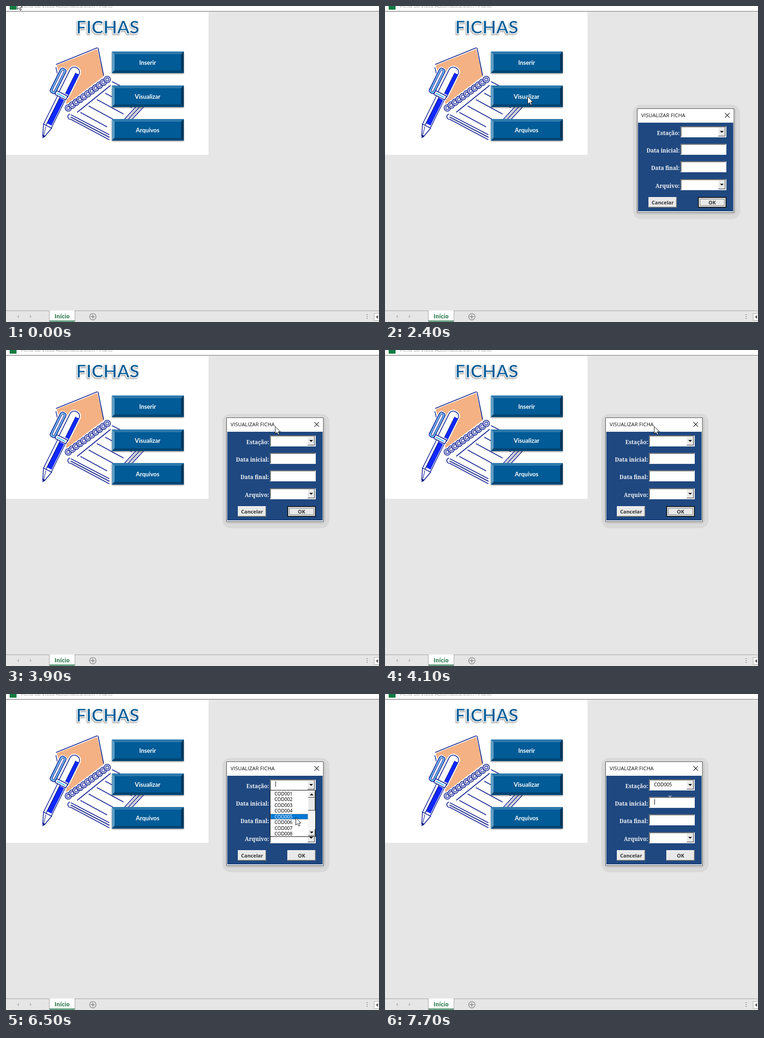
Recreate the animation shown at these times as an HTML page with a canvas. Size 814 by 688 pixels, loop 8 s.

```html
<!DOCTYPE html>
<html lang="pt">
<head>
<meta charset="utf-8">
<title>Fichas</title>
<style>
html, body { margin: 0; width: 100%; height: 100%; overflow: hidden; background: #e6e6e6; }
canvas { display: block; }
</style>
</head>
<body>
<canvas id="stage" width="814" height="688"></canvas>
<script>
const ctx = document.getElementById('stage').getContext('2d');
const LOOP = 8000, STEP = 100;
const NAVY = '#0b1a8c', BLUE = '#1027ff', CYAN = '#35b4ff';
const SANS = '"Open Sans", sans-serif', LATO = 'Lato, Carlito, sans-serif';
const ITEM_FONT = '10.2px "Noto Sans", sans-serif';
const ACTIVE = 400, OPEN = 2300, GRAB = 3600, DROP = 3900;
const LIST_OPEN = 4800, PICK = 6700, NEXT_FIELD = 7600;

// each move: start, end, target x, target y, sideways bend of the path
const moves = [
  [300, 1300, 311, 197, 0, 140],
  [2600, 3500, 656, 242, 280, 75],
  [GRAB, 3700, 609, 219, 0, 0],
  [3800, DROP, 587, 166, 0, 0],
  [4100, 4700, 659, 197, 0, 0],
  [5800, 6500, 632, 269, 0, 70],
  [6800, 7700, 622, 229, 0, 0]
];

function pointerAt(t) {
  let x = 24, y = -9;
  for (const [from, to, tx, ty, bx, by] of moves) {
    const k = Math.min(1, Math.max(0, (t - from) / (to - from)));
    const bend = Math.sin(Math.PI * k);
    if (k > 0) {
      x += (tx - x) * k + bx * bend;
      y += (ty - y) * k + by * bend;
    }
  }
  return [Math.round(x), Math.round(y)];
}

function rect(x, y, w, h, color) {
  ctx.fillStyle = color;
  ctx.fillRect(x, y, w, h);
}

function frame(x, y, w, h, color, dash = []) {
  ctx.setLineDash(dash);
  ctx.strokeStyle = color;
  ctx.lineWidth = 1;
  ctx.strokeRect(x + .5, y + .5, w - 1, h - 1);
  ctx.setLineDash([]);
}

function paint(fill, stroke, width) {
  if (fill) {
    ctx.fillStyle = fill;
    ctx.fill();
  }
  if (stroke) {
    ctx.strokeStyle = stroke;
    ctx.lineWidth = width;
    ctx.stroke();
  }
}

function round(x, y, w, h, r, fill, stroke, width) {
  ctx.beginPath();
  ctx.roundRect(x, y, w, h, r);
  paint(fill, stroke, width);
}

function poly(points, fill, stroke, width) {
  ctx.beginPath();
  for (let i = 0; i < points.length; i += 2) ctx.lineTo(points[i], points[i + 1]);
  ctx.closePath();
  paint(fill, stroke, width);
}

function line(x1, y1, x2, y2, color = NAVY, width = 1.7) {
  ctx.beginPath();
  ctx.moveTo(x1, y1);
  ctx.lineTo(x2, y2);
  paint(null, color, width);
}

function circle(x, y, r, color, width, fill) {
  ctx.beginPath();
  ctx.arc(x, y, r, 0, Math.PI * 2);
  paint(fill, color, width);
}

function triangle(x, y, w, h, color) {
  poly([x - w, y - h, x + w, y - h, x, y + h], color);
}

function text(str, x, y, font, color, align = 'left') {
  ctx.font = font;
  ctx.textAlign = align;
  ctx.fillStyle = color;
  ctx.fillText(str, x, y);
}

function drawWindow(active) {
  rect(0, 0, 814, 688, '#e6e6e6');
  rect(0, 0, 814, 11, '#fff');
  rect(0, 11, 814, 1, active ? '#217346' : '#6b6b6b');
  rect(8, -7, 15, 15, '#107c41');
  text('Ficha de Visita Automática.xlsm - Plano', 33, 4, '11px ' + SANS, active ? '#333' : '#aaa');
  rect(0, 13, 442, 311, '#fff');

  rect(0, 663, 814, 1, '#9f9f9f');
  rect(94, 663, 57, 24, '#9f9f9f');
  rect(95, 663, 55, 24, '#fff');
  rect(95, 685, 55, 2, '#217346');
  text('Início', 122.5, 680, '700 12px ' + SANS, '#217346', 'center');
  poly([24, 676, 28, 672, 28, 680], '#bdbdbd');
  poly([56, 676, 52, 672, 52, 680], '#bdbdbd');
  circle(189.5, 676.5, 7, '#6a6a6a', 1.1);
  rect(185, 676, 9, 1, '#555');
  rect(189, 672, 1, 9, '#555');
  for (let i = 0; i < 3; i++) rect(787, 671 + i * 4, 2, 2, '#999');
  rect(803, 669, 11, 16, '#fff');
  frame(803, 669, 14, 16, '#aaa');
  poly([807, 677, 812, 673, 812, 681], '#555');
}

function drawHeading() {
  ctx.save();
  ctx.translate(222, 59.5);
  ctx.font = '700 39px ' + LATO;
  ctx.textAlign = 'center';
  ctx.lineJoin = 'round';
  ctx.strokeStyle = '#fff';
  ctx.fillStyle = '#005b97';
  ctx.save();
  ctx.shadowColor = 'rgba(0,0,0,.5)';
  ctx.shadowBlur = 3;
  ctx.shadowOffsetX = -1;
  ctx.shadowOffsetY = 2;
  ctx.lineWidth = 2;
  ctx.strokeText('FICHAS', 0, 0);
  ctx.restore();
  ctx.fillText('FICHAS', 0, 0);
  ctx.lineWidth = 1;
  ctx.strokeText('FICHAS', 0, 0);
  ctx.restore();
}

function drawNotebook() {
  ctx.save();
  ctx.lineCap = ctx.lineJoin = 'round';
  poly([111, 129, 199, 94, 213, 153, 132, 214], '#f4b183');
  line(110, 127, 199, 91);
  line(201, 92, 213, 151);
  for (let i = 0; i < 3; i++) line(109 + i * 6, 134 + i * 25, 112 + i * 6, 147 + i * 25, NAVY, 1.5);

  // page edges and ruled lines share one slant
  line(228, 173, 156, 231);
  line(232, 165, 250, 174);
  for (let i = 0; i < 4; i++) {
    const x = 217 - i * 18, y = 190 + i * 14;
    line(x, y, x + 57, y + 31);
  }
  line(140, 242, 226, 286, '#c9c9d2', 3);
  for (let i = 0; i < 3; i++) line(142, 237 + i * 5, 225, 280 + i * 5.5, NAVY, 1.6);
  ctx.beginPath();
  ctx.arc(141, 241, 6, Math.PI / 2, Math.PI * 1.4);
  paint(null, NAVY, 1.7);
  for (let i = 0; i < 3; i++) {
    const x = 284 + i * 8.5;
    if (i) line(x - 4, 219, x - 30, 247, '#c9c9d2', 3);
    line(x, 219, x - 26, 247, NAVY, 1.6);
  }

  for (let i = 0; i <= 10; i++) {
    const x = 136 + i * 8.5, y = 222 - i * 6.2;
    circle(x, y, 7, NAVY, 1.6, '#dfe1f3');
    circle(x, y, 3.3, NAVY, 1.4, '#fff');
  }
  drawPen();
  ctx.restore();
}

// upright pen with its tip at the origin, then tilted
function drawPen() {
  ctx.save();
  ctx.translate(81, 288);
  ctx.rotate(26.5 * Math.PI / 180);
  const cap = [10, 10, 0, 0];
  round(-14, -170, 22, 66, cap, '#fff', '#fff', 6);
  round(-33, -156, 13, 59, 5, '#fff', '#fff', 5);
  rect(-16, -104, 25, 78, '#fff');

  round(-14, -170, 22, 66, cap, '#fff', NAVY, 1.6);
  rect(0, -159, 8, 50, BLUE);
  line(0, -159, 0, -109, NAVY, 1.2);
  round(-33, -156, 13, 59, 5, null, NAVY, 1.8);
  round(-31, -154, 9, 55, 3, null, CYAN, 1.5);
  round(-29, -152, 5, 51, 2, '#fff', NAVY, 1.3);

  rect(-7, -95, 11, 62, BLUE);
  for (const x of [-13, -7, 6]) line(x, -96, x, -28, NAVY, 1.5);
  round(-20, -106, 27, 9, 2, '#fff', NAVY, 1.7);
  line(-16, -101, 3, -101, CYAN, 2);
  poly([-13, -28, 7, -28, 1, -4, -3, -4], '#fff', NAVY, 1.6);
  line(-6, -25, -2, -8, NAVY, 1.2);
  triangle(-1, -3, 3, 4, NAVY);
  ctx.restore();
}

function drawMenuButton(label, y) {
  const x = 231, r = 388, b = y + 47, e = 6;
  ctx.save();
  ctx.shadowColor = 'rgba(0,0,0,.45)';
  ctx.shadowBlur = 3;
  ctx.shadowOffsetY = 1.5;
  rect(x, y, r - x, b - y, '#005b97');
  ctx.restore();
  poly([x, y, r, y, r - e, y + e, x + e, y + e], '#2d79ac');
  poly([x, y, x + e, y + e, x + e, b - e, x, b], '#5e9dc4');
  poly([r, y, r, b, r - e, b - e, r - e, y + e], '#00375d');
  poly([x, b, x + e, b - e, r - e, b - e, r, b], '#004673');
  text(label, 309, y + 29, '700 13px ' + LATO, '#fff', 'center');
}

function drawField(x, y) {
  rect(x, y, 100, 24, '#f4f4f4');
  rect(x, y, 99, 23, '#8a8a8a');
  rect(x + 1, y + 1, 97, 21, '#555');
  rect(x + 2, y + 2, 97, 21, '#fff');
}

function bevel(x, y, w, h) {
  rect(x, y, w, h, '#666');
  rect(x, y, w - 1, h - 1, '#fff');
  rect(x + 1, y + 1, w - 2, h - 2, '#a6a6a6');
  rect(x + 1, y + 1, w - 3, h - 3, '#e9e9e9');
}

function arrowButton(x, y, w, h, up) {
  bevel(x, y, w, h);
  triangle(x + w / 2, y + h / 2, 4, up ? -2 : 2, '#000');
}

function drawCombo(x, y) {
  drawField(x, y);
  arrowButton(x + 82, y + 2, 16, 20);
}

function pushButton(label, x, y, focused) {
  bevel(x, y, 62, 23);
  if (focused) {
    frame(x, y, 62, 23, '#000');
    frame(x + 1, y + 1, 60, 21, '#555');
    frame(x + 4, y + 4, 54, 15, '#000', [1, 1]);
  }
  text(label, x + 31, y + 16, '700 11px "Noto Sans", sans-serif', '#333', 'center');
}

function drawDialog(x, y, t) {
  round(x - 10, y - 9, 234, 249, 18, '#d9d9d9');
  round(x - 3, y - 2, 218, 232, 7, '#c9c9c9');
  rect(x - 1, y - 1, 212, 227, '#555');
  rect(x, y, 210, 225, '#fff');
  rect(x + 1, y + 30, 208, 193, '#1f4880');
  text('VISUALIZAR FICHA', x + 8, y + 18, '11.4px ' + SANS, '#111');
  line(x + 191, y + 9, x + 201, y + 19, '#222', 1.1);
  line(x + 201, y + 9, x + 191, y + 19, '#222', 1.1);

  ['Estação:', 'Data inicial:', 'Data final:', 'Arquivo:'].forEach((label, i) => {
    const fy = Math.floor(y + 38 + i * 38.4);
    const drawInput = i % 3 ? drawField : drawCombo;
    text(label, x + 92, fy + 19, '700 11.8px "Noto Serif", serif', '#f5f5f5', 'right');
    drawInput(x + 94, fy);
  });
  pushButton('Cancelar', x + 24, y + 192, false);
  pushButton('OK', x + 132, y + 192, t < LIST_OPEN);

  if (t >= PICK) text('COD005', x + 105, y + 53, ITEM_FONT, '#000');
  const caretOn = t >= 4920 && Math.floor((t - 4920) / 530) % 2 === 0;
  if (t >= NEXT_FIELD) rect(x + 106, y + 81, 1, 12, '#000');
  else if (caretOn) rect(x + 106, y + 42, 1, 12, '#000');
}

function drawList(pointerY) {
  const x = 576, y = 209, rowH = 12.5;
  const row = Math.min(7, Math.floor((pointerY - 210) / rowH));
  rect(x, y, 100, 102, '#000');
  rect(x + 1, y + 1, 98, 100, '#fff');
  for (let i = 0; i < 8; i++) {
    const top = Math.round(210.5 + i * rowH), hot = i === row;
    if (hot) rect(x + 1, top, 82, 12, '#0078d7');
    if (i === Math.max(row, 0)) frame(x + 1, top, 82, 12, hot ? '#e0a060' : '#000', [1, 1]);
    text('COD00' + (i + 1), x + 10, top + 9.5, ITEM_FONT, hot ? '#fff' : '#000');
  }
  rect(x + 83, y + 1, 16, 100, '#f5f5f5');
  arrowButton(x + 83, y + 2, 16, 15, true);
  bevel(x + 83, y + 17, 16, 28);
  arrowButton(x + 83, y + 85, 16, 15, false);
}

function drawArrow() {
  poly([0, 0, 0, 16, 4, 12.5, 6.5, 18, 9, 17, 6.5, 11.5, 11.5, 11.5], '#fff', '#111', 1);
}

function drawHand() {
  // dark silhouette first, white on top
  for (const [grow, color] of [[1, '#111'], [0, '#fff']]) {
    const part = (x, y, w, h, r) =>
      round(x - grow, y - grow, w + grow * 2, h + grow * 2, r + grow, color);
    part(-1, 1, 3, 14, 1.5);
    for (let i = 1; i < 4; i++) part(i * 3 - 1, 6 + i, 3, 8, 1.5);
    part(-5, 11, 4, 4, 2);
    part(-3, 12, 13, 6, 2);
    part(-1, 14, 9, 6, 1);
  }
  for (let i = 1; i < 4; i++) line(i * 3 - 1, 9, i * 3 - 1, 12, '#111', .8);
}

function drawBeam() {
  rect(-4, -8, 3, 1, '#fff');
  rect(0, -8, 3, 1, '#fff');
  rect(-1, -7, 1, 14, '#fff');
}

const menu = ['Inserir', 'Visualizar', 'Arquivos'];
const menuY = i => Math.round(99 + i * 73.5);

function drawPointer(t, x, y) {
  const overMenu = x > 230 && x < 389 && menu.some((_, i) => y >= menuY(i) && y < menuY(i) + 47);
  ctx.save();
  ctx.translate(x + .5, y + .5);
  if (t < 2400 && overMenu) drawHand();
  else if (t >= 7400) drawBeam();
  else drawArrow();
  ctx.restore();
}

function draw(ms) {
  const t = Math.floor(ms / STEP) * STEP;
  const [px, py] = pointerAt(t);
  drawWindow(t >= ACTIVE && t < OPEN);
  drawHeading();
  drawNotebook();
  menu.forEach((label, i) => drawMenuButton(label, menuY(i)));
  if (t >= OPEN) {
    // the dialog is dragged along with the pointer
    const [gx, gy] = pointerAt(Math.min(Math.max(t, GRAB), DROP));
    drawDialog(gx - 105, gy - 18, t);
    if (t >= LIST_OPEN && t < PICK) drawList(py);
  }
  drawPointer(t, px, py);
}

const start = performance.now();
function tick() {
  draw((performance.now() - start) % LOOP);
  requestAnimationFrame(tick);
}
tick();
</script>
</body>
</html>
```
